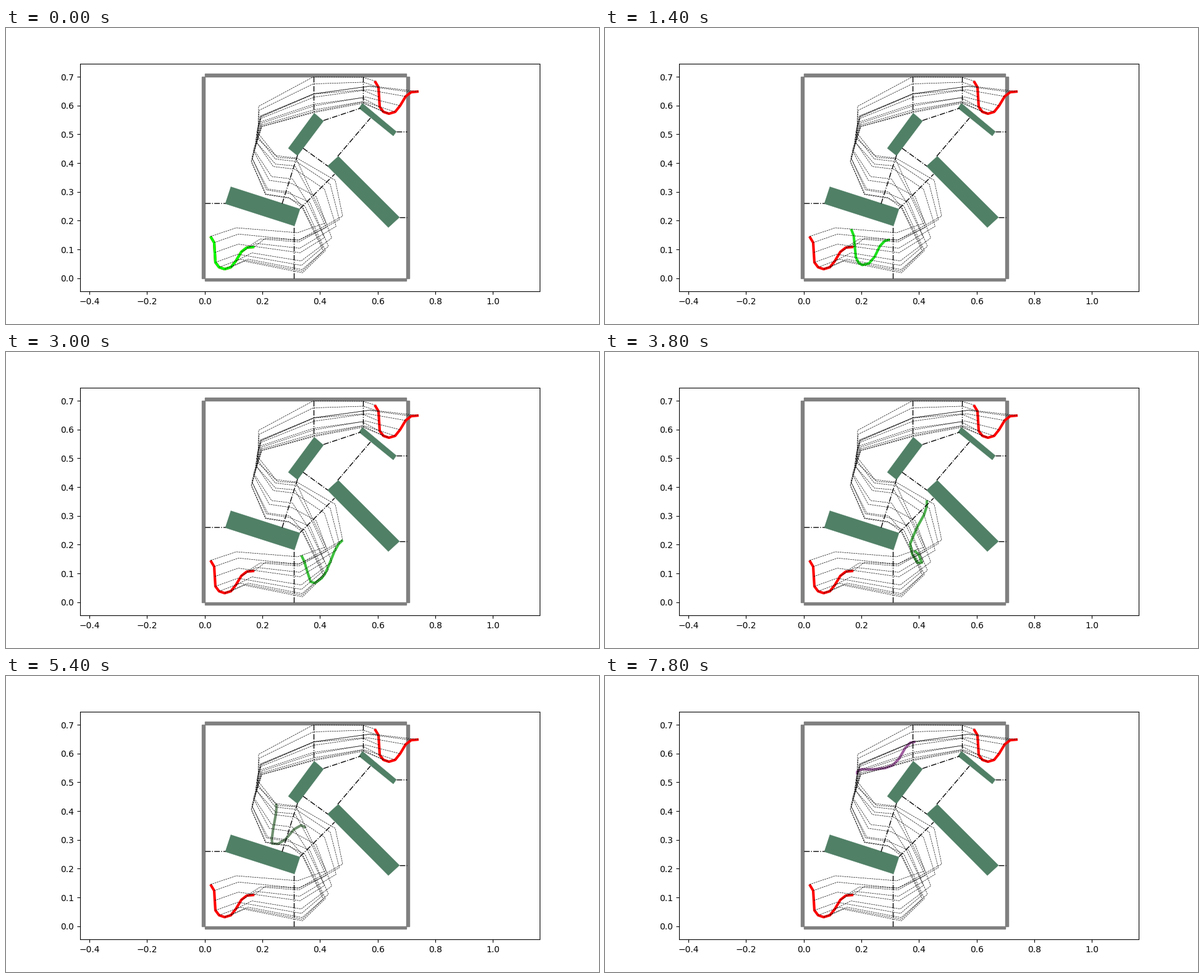
These frames come from a looping animation (960 px wide and 480 px high, 8 s). A matplotlib script:

```python
import numpy as np
import matplotlib.pyplot as plt
from matplotlib.animation import FuncAnimation

FRAMES, INTERVAL = 40, 200
TRIP = 62              # steps from start to goal
SCALE = 369.6 / 0.792  # pixels per data unit
ORIGIN = np.array([321.75, 405.73])

# Cable at rest, in stage pixels; nodes 0, 5 and 10 are tail, belly and head
REST = np.array([(331, 338), (337, 348), (338, 364), (339, 380), (345, 388),
                 (354, 391), (364, 388), (372, 378), (381, 363), (390, 356),
                 (402, 355)], float)
KEY = [0, 5, 10]
NODES = np.arange(len(REST))

# Bends on the way: arrival time and place of tail, belly and head
BENDS = [
    ((4.6, 4.6, 2.6), (373, 324), (385, 378), (420, 341)),
    ((13.9, 11.8, 8.4), (472, 332), (480, 397), (474, 344)),
    ((22, 15.6, 15), (518, 316), (517, 361), (545, 305)),
    ((24.5, 20.5, 18.3), (497, 272), (484, 289), (533, 247)),
    ((30.3, 23.2, 22), (470, 212), (458, 276), (471, 211)),
    ((34, 28.5, 27), (440, 210), (420, 270), (437, 207)),
    ((37.4, 33.7, 31), (408, 180), (397, 216), (406, 168)),
    ((41.6, 37, 33), (409, 127), (414, 160), (413, 144)),
    ((47.5, 41.3, 38.8), (497, 79.5), (499, 137), (499, 107)),
    ((54, 47, 44), (578, 80), (578, 122), (590, 94)),
]


def to_data(pts):
    return (np.asarray(pts, float) - ORIGIN) / (SCALE, -SCALE)


def homogeneous(pts):
    return np.column_stack([pts, np.ones(len(pts))])


# Share of tail, belly and head in each node: every bend is an affine cable
SHARES = homogeneous(REST) @ np.linalg.inv(homogeneous(REST[KEY]))
GOAL = REST + (266, -252)

times = [0 * NODES] + [np.interp(NODES, KEY, t) for t, *_ in BENDS]
times = np.array(times + [TRIP + 0 * NODES])
places = [REST] + [SHARES @ np.array(p, float) for _, *p in BENDS] + [GOAL]
tracks = to_data(places)  # bend, node, xy


def cable_at(step):
    return np.array([[np.interp(step, times[:, n], tracks[:, n, axis])
                      for n in NODES] for axis in (0, 1)])


WALLS = [(-0.01, 0, 0, 0.7), (0.7, 0, 0.71, 0.7),
         (0, -0.01, 0.7, 0), (0, 0.7, 0.7, 0.71)]
BLOCKS = [
    [(364, 257.5), (476, 293.5), (467, 321), (355, 285)],
    [(499, 138), (514, 151), (472, 207), (457, 195)],
    [(538, 208), (637, 307), (619, 323.5), (520.5, 224)],
    [(577, 122), (632, 168), (627, 175), (571.5, 130)],
]
GATES = [
    [(322, 284.4), (355, 284.4)], [(466.3, 405.7), (466.3, 321)],
    [(476, 293), (532, 237)], [(447, 285), (472, 206)],
    [(498.3, 79), (498.3, 138)], [(514, 150), (574, 130)],
    [(481, 195), (521, 224)], [(537, 208), (590, 146)],
    [(637, 307), (648.5, 307)], [(578.3, 79), (578.3, 122)],
    [(632, 168), (648.5, 168)],
]

fig, ax = plt.subplots(figsize=(9.6, 4.8), dpi=100)
fig.subplots_adjust(left=0.125, right=0.9, bottom=0.11, top=0.88)
ax.set_xlim((120 - ORIGIN[0]) / SCALE, (864 - ORIGIN[0]) / SCALE)
ax.set_ylim(-0.046, 0.746)

for x0, y0, x1, y1 in WALLS:
    ax.fill([x0, x1, x1, x0], [y0, y0, y1, y1], color="gray", lw=1)
for block in BLOCKS:
    ax.fill(*to_data(block).T, color="#508066", lw=0.3)
for shape in (REST, GOAL):
    ax.plot(*to_data(shape).T, color="red", lw=3, solid_capstyle="butt", zorder=3)
rope, = ax.plot([], [], lw=3, solid_capstyle="butt", zorder=4)
for gate in GATES:
    ax.plot(*to_data(gate).T, "k-.", lw=1, zorder=5)
for n in NODES:
    ax.plot(*tracks[:, n].T, "k--", lw=0.5, zorder=5)


def draw(step):
    t = step / TRIP
    rope.set_data(*cable_at(step))
    rope.set_color((t, 1 - t, t))
    return rope,


anim = FuncAnimation(fig, draw, frames=FRAMES, interval=INTERVAL,
                     init_func=lambda: draw(0), repeat=True, repeat_delay=0)
plt.show()
```
